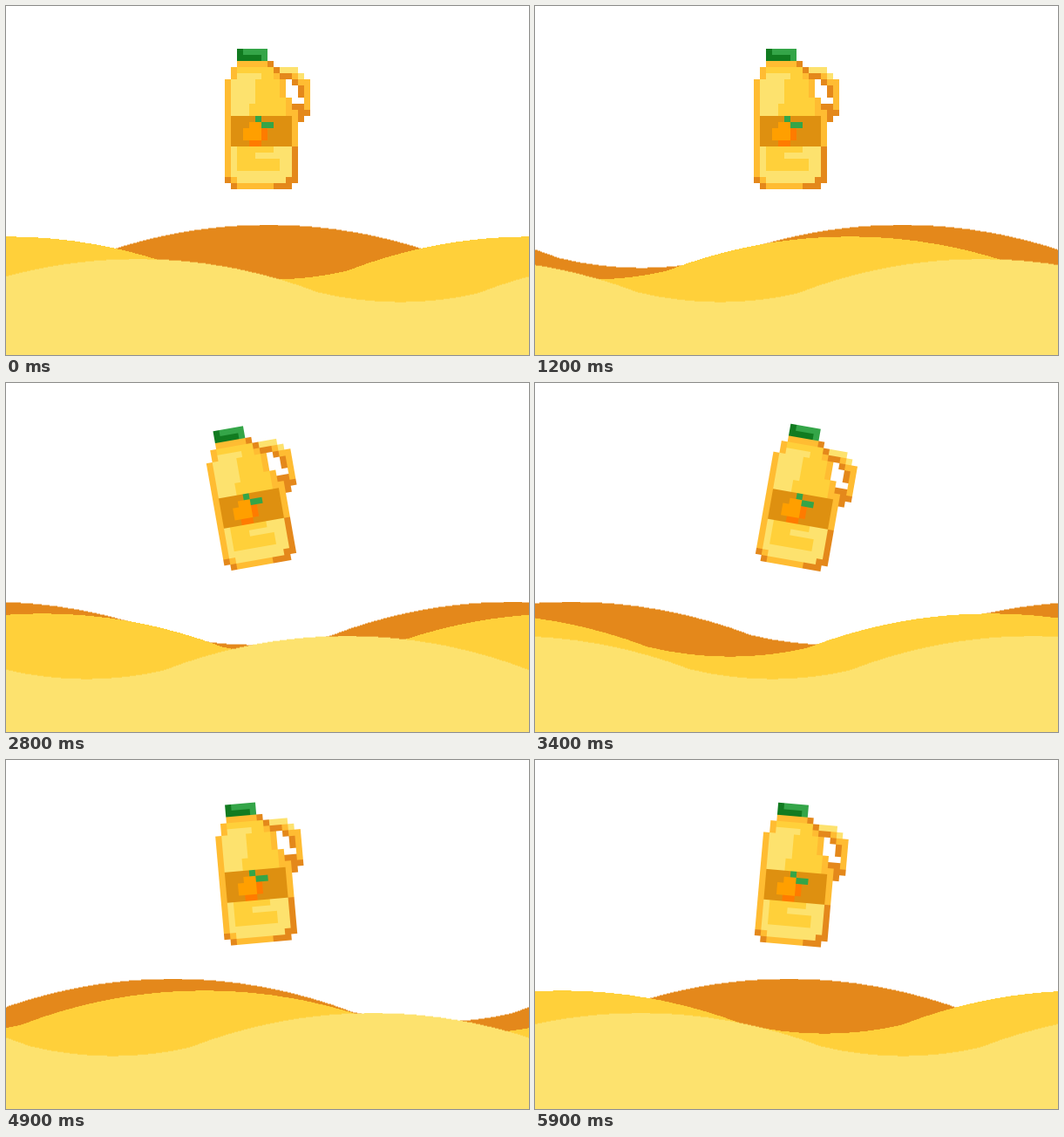
An HTML page without scripts that plays this animation: 600 px wide and 400 px high, repeating every 6 s.

```html
<!DOCTYPE html>
<html lang="en">
<head>
<meta charset="utf-8">
<title>Juice bottle over waves</title>
<style>
  html, body { margin: 0; width: 100%; height: 100%; overflow: hidden; background: #fff; }
  svg { display: block; width: 600px; height: 400px; }

  .amber { fill: #ffbc32; }
  .yellow { fill: #ffd03a; }
  .pale { fill: #fde26e; }
  .dark { fill: #e4881b; }
  .label { fill: #de9010; }
  .fruit { fill: #ff9f00; }
  .shade { fill: #ff7b00; }
  .green { fill: #34a548; }
  .forest { fill: #117b20; }

  /* Waves repeat every 600px and move 10 times a second. */
  .back { animation: back 6s steps(60) infinite; }
  .middle { animation: middle 6s steps(30) infinite; }
  .front { animation: front 2s steps(20) infinite; }
  @keyframes back {
    from { transform: translate(300px, 250.5px); }
    to { transform: translate(900px, 250.5px); }
  }
  @keyframes middle {
    0% { transform: translate(1200px, 263.9px); }
    50% { transform: translate(600px, 263.9px); }
    100% { transform: translate(10px, 263.9px); }
  }
  @keyframes front {
    from { transform: translate(150px, 289.6px); }
    to { transform: translate(750px, 289.6px); }
  }

  /* The bottle rocks on its base in 5 degree steps. */
  .bottle {
    transform-origin: 293px 210px;
    animation: rock 1.2s infinite, settle 1.2s step-end infinite;
  }
  @keyframes rock {
    0% { rotate: 0deg; animation-timing-function: steps(3); }
    25% { rotate: -15deg; animation-timing-function: steps(6); }
    75% { rotate: 15deg; animation-timing-function: steps(3); }
    100% { rotate: 0deg; }
  }
  @keyframes settle {
    0%, 50%, 66.666%, 83.333%, 100% { translate: 0 0; }
    8.333%, 41.666% { translate: 0 -.5px; }
    16.666%, 75% { translate: 0 -1px; }
    58.333%, 91.666% { translate: 0 1.6px; }
  }
</style>
</head>
<body>
<svg viewBox="0 0 600 400" shape-rendering="crispEdges">
  <defs>
    <path id="tile" d="M-210 40A580 580 0 0 1 208 38.5A407 407 0 0 0 390 40V200H-210z"/>
    <g id="tiles">
      <use href="#tile" x="-1200"/>
      <use href="#tile" x="-600"/>
      <use href="#tile"/>
      <use href="#tile" x="600"/>
    </g>
  </defs>

  <g class="back dark"><use href="#tiles"/></g>
  <g class="middle yellow"><use href="#tiles"/></g>
  <g class="front pale"><use href="#tiles"/></g>

  <g class="bottle">
    <!-- one unit is one 7px block -->
    <g transform="translate(251 49) scale(7)">
      <path class="amber" d="M2 2H7V3H8V4H9V5H10V8H11V10H13V11H12V16H11V22H8V23H2V22H1V21H0V5H1V3H2z M11 4h2v1h1v5h-1V6h-1V5h-1z"/>
      <path class="yellow" d="M2 3H8V5H9V8H10V11H1V5H2z M2 16H8V17H9V20H2z"/>
      <path class="pale" d="M2 4H6V5H5V9H4V11H1V5H2z M9 3h3v1h1v1h-1V4H9z"/>
      <path class="pale" d="M1 16H2V20H9V18H5V17H8V16H11V21H10V22H2V21H1z"/>
      <path class="dark" d="M7 2h1v1h1v1h2v1h1v1h1v2h-1V6h-1V5H9V4H8V3H7z M11 9h2v1h1v1h-1v1h-1v-2h-1z"/>
      <path class="dark" d="M11 16h1v6h-1v1H8v-1h2v-1h1z M0 21h1v1h1v1H1v-1H0z"/>
      <path class="label" d="M1 11H11V16H1z"/>
      <path class="fruit" d="M4 12H6V13H7V14H6V15H3V13H4z"/>
      <path class="shade" d="M6 13H7V15H6V16H4V15H6z"/>
      <path class="green" d="M5 11h1v1h2v1H6v-1H5z M3 0h4v2H6V1H3z"/>
      <path class="forest" d="M2 0h1v1h3v1H2z"/>
    </g>
  </g>
</svg>
</body>
</html>
```
